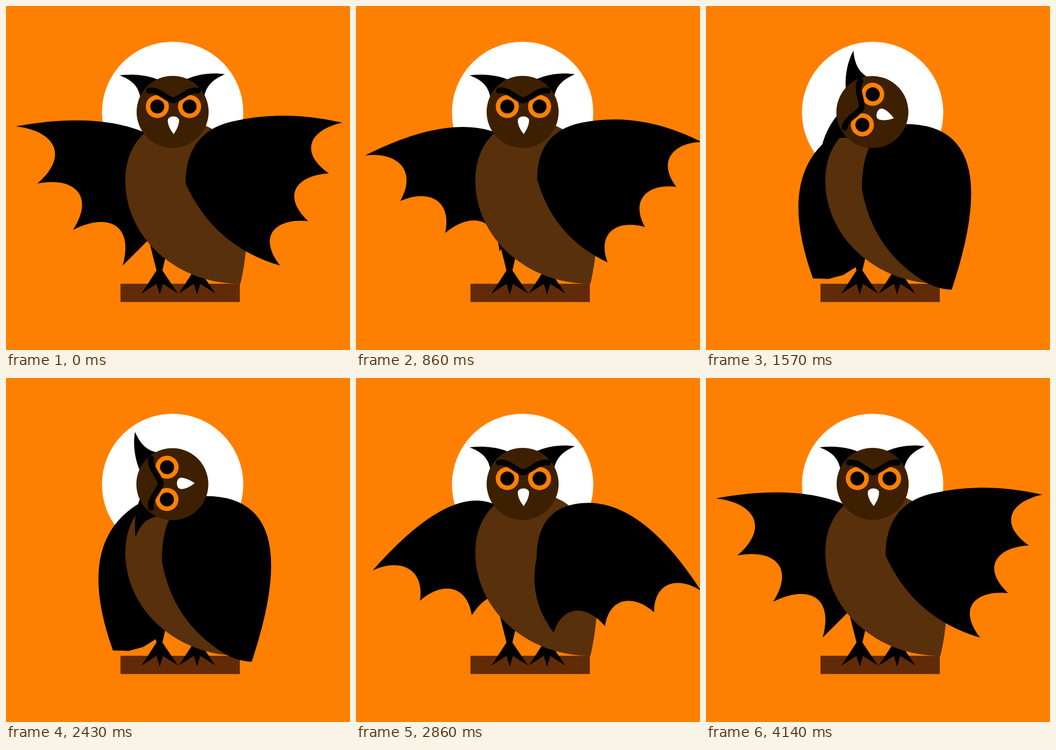
An HTML page for the animation above (4.78 s loop, 640 px wide and 640 px high).

```html
<!DOCTYPE html>
<html lang="en">
<head>
<meta charset="utf-8">
<title>Owl</title>
<style>
html, body { margin: 0; height: 100%; overflow: hidden; background: #ff8000; }
svg { display: block; width: 100vw; height: 100vh; }
</style>
</head>
<body>
<svg viewBox="0 0 640 640">
  <circle cx="310" cy="198" r="131.5" fill="#fff"/>
  <path id="left"/>
  <path fill="#622b08" d="M213 516.8H435V550.7H213Z"/>
  <g id="leg">
    <path d="M262 420L280 492L252 535L280 517L286 537L292 517L320 535L291 492L302 445Z"/>
  </g>
  <use href="#leg" x="69.5"/>
  <path fill="#58300b" d="M436 517A214 192 0 0 1 222 325C222 285 236 255 260 234C285 205 370 205 405 246C460 300 455 440 436 517Z"/>
  <path id="right"/>
  <g id="head">
    <path d="M211 129C235 126 260 128 283 137L250 170C246 148 233 137 211 129Z"/>
    <path d="M407 127C383 123 357 127 336 136L369 168C372 150 384 137 407 127Z"/>
    <circle cx="310" cy="197" r="67" fill="#3d2001"/>
    <g id="eyes">
      <g id="eye">
        <circle cx="281.5" cy="187" r="21.5" fill="#ff8000"/>
        <circle cx="281.5" cy="187" r="13"/>
      </g>
      <use href="#eye" x="60"/>
    </g>
    <path fill="none" stroke="#000" stroke-width="11" stroke-linecap="round" d="M266 157.5C281 153 299 174 311 175.5C323 174 342 153 357 157.5"/>
    <path fill="#fff" d="M312 238.5C306 231 301 222 301 213C301 203 322 203 322 213C322 222 317 231 312 238.5Z"/>
  </g>
</svg>
<script>
const LOOP = 4780, FPS = 14;
const $ = id => document.getElementById(id);

// A pose is five points: root, top of shoulder, bend of the leading edge, tip, lower end.
const hidden = [[300, 400], [250, 232]];
const left = {
  side: 1, bow: 0.1, trail: 0, pivot: [255, 250],
  spread: [...hidden, [160, 198], [18, 224], [217, 483]],
  dip: [...hidden, [160, 206], [17, 278], [267, 457]],
  close: [...hidden, [134, 272], [165, 490], [276, 470]],
  fold: [...hidden, [126, 304], [199, 507], [280, 485]],
  open: [...hidden, [166, 205], [31, 358], [320, 440]]
};
const right = {
  side: -1, bow: 0.05, trail: 0.23, pivot: [380, 260],
  spread: [[334, 330], [420, 215], [517, 192], [626, 217], [510, 483]],
  dip: [[337, 322], [420, 217], [529, 195], [643, 253], [468, 477]],
  close: [[316, 325], [415, 218], [532, 218], [564, 478], [466, 480]],
  fold: [[290, 340], [385, 220], [556, 232], [457, 528], [410, 515]],
  open: [[336, 335], [410, 234], [525, 215], [642, 396], [368, 474]]
};
const depths = {spread: 1, dip: 0.85, close: 0, fold: 0, open: 0.8};

const moves = [
  {from: 'spread', to: 'dip', start: 8, end: 12, ease: u => u ** 2},
  {from: 'dip', to: 'close', start: 12, end: 16, ease: u => u ** 1.5},
  {from: 'close', to: 'fold', start: 16, end: 20, ease: u => 1 - (1 - u) ** 2},
  {from: 'fold', to: 'open', start: 34, end: 40, ease: u => u ** 1.7},
  {from: 'open', to: 'spread', start: 40, end: 44, ease: u => 1 - (1 - u) ** 3}
];

const clamp = (v, lo = 0, hi = 1) => Math.min(hi, Math.max(lo, v));
const mix = (a, b, u) => a + (b - a) * u;
const lerp = (p, q, u) => [mix(p[0], q[0], u), mix(p[1], q[1], u)];
const angle = (p, c) => Math.atan2(p[1] - c[1], p[0] - c[0]);

function rotate([x, y], [cx, cy], a) {
  const c = Math.cos(a), s = Math.sin(a);
  x -= cx;
  y -= cy;
  return [cx + x * c - y * s, cy + x * s + y * c];
}

// Point measured along and across the line from a to b.
function beside(a, b, along, across) {
  const dx = b[0] - a[0], dy = b[1] - a[1];
  return [a[0] + along * dx - across * dy, a[1] + along * dy + across * dx];
}

// Blend two poses while swinging the wing round its shoulder.
function blend({pivot}, from, to, u) {
  const swing = angle(to[3], pivot) - angle(from[3], pivot);
  const turn = 0.7 * Math.atan2(Math.sin(swing), Math.cos(swing));
  return from.map((p, i) => rotate(lerp(p, rotate(to[i], pivot, -turn), u), pivot, turn * u));
}

function outline({side, bow, trail}, [root, top, bend, tip, end], depth) {
  const corner = lerp(top, bend, (root[0] - top[0]) / (bend[0] - top[0]));
  const claws = [tip, beside(tip, end, 1 / 3, side * bow), beside(tip, end, 2 / 3, side * bow), end];
  let d = `M${root}Q${corner} ${top}Q${bend} ${tip}`;
  for (let i = 0; i < 3; i++) {
    const a = claws[i], b = claws[i + 1], hollow = -side * depth;
    d += `C${beside(a, b, 0.29, 0.57 * hollow)} ${beside(a, b, 0.76, 0.66 * hollow)} ${b}`;
  }
  return d + `Q${beside(end, root, 0.5, side * trail)} ${root}Z`;
}

// The head tips over, returns and swings slightly past upright.
function tiltAt(tick) {
  const over = Math.sin(clamp((tick - 16) / 10.3) * Math.PI / 2);
  const u = clamp((tick - 33.8) / 6.2);
  const back = u * u * (3 - 2 * u);
  return 90 * (back - over) + 3 * Math.sin(clamp((tick - 40) / 4) * Math.PI);
}

// Two quick blinks, repeated once.
function lidAt(ms) {
  const gaps = [235, 585, 3725, 4075].map(t => Math.abs(ms - t));
  return clamp(Math.min(...gaps) / 55, 0.1);
}

function draw() {
  const tick = Math.floor((performance.now() % LOOP + 4) * FPS / 1000);
  const {from, to, start, end, ease} = moves.findLast(m => m.start <= tick) || moves[0];
  const u = ease(clamp((tick - start) / (end - start)));
  const depth = mix(depths[from], depths[to], u);
  for (const [id, wing] of Object.entries({left, right})) {
    $(id).setAttribute('d', outline(wing, blend(wing, wing[from], wing[to], u), depth));
  }
  $('head').setAttribute('transform', `rotate(${tiltAt(tick)} 310 197.5)`);
  $('eyes').setAttribute('transform', `translate(0 187) scale(1 ${lidAt(tick * 1000 / FPS)}) translate(0 -187)`);
  requestAnimationFrame(draw);
}
draw();
</script>
</body>
</html>
```
